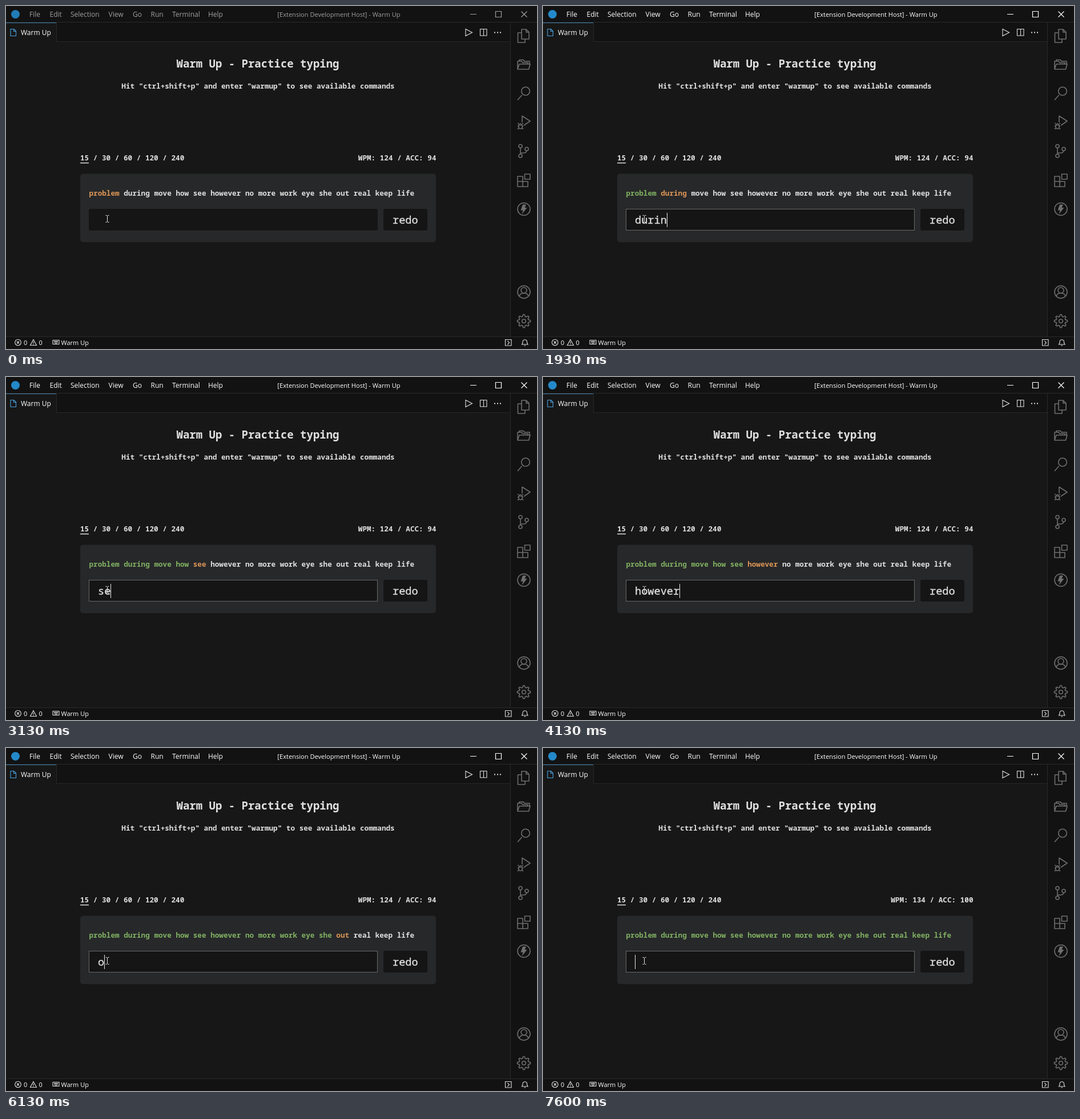
Write an HTML page that moves like this. It is 930 by 602 pixels and loops after 8 s.

```html
<!DOCTYPE html>
<html lang="en">
<head>
<meta charset="utf-8">
<title>Typing practice</title>
<style>
  html, body { margin: 0; width: 100%; height: 100%; overflow: hidden; background: #171717; }
  svg { display: block; width: 930px; height: 602px; }
  text { white-space: pre; fill: #e0e0e0; }
  .ui { font-family: "Open Sans", "Noto Sans", sans-serif; font-size: 12px; }
  .ui text { fill: #fff; }
  .mono { font-family: "Noto Sans Mono", "DejaVu Sans Mono", monospace; font-size: 12.67px; font-weight: 600; }
  .mono .big { font-size: 18.6px; font-weight: 500; stroke: #e0e0e0; stroke-width: .35; }
  .mono .heading { font-size: 19px; font-weight: 700; }
  .bar { fill: #121212; }
  .rule { stroke: #292929; fill: none; }
  .icon { fill: none; stroke: #e0e0e0; stroke-width: 1.1; }
  .side { fill: none; stroke: #6f6f6f; stroke-width: 1.6; stroke-linejoin: round; }
  .small { font-size: 11px; }
  #chrome text { fill: inherit; }
  .done { fill: #80b162; }
  .current { fill: #dc9656; }
</style>
</head>
<body>
<svg viewBox="0 0 930 602">
  <rect class="bar" width="930" height="28"/>
  <rect class="bar" y="29" width="883" height="33"/>
  <rect class="bar" x="884" y="29" width="46" height="551"/>
  <rect class="bar" y="581" width="930" height="21"/>
  <rect y="29" width="88" height="34" fill="#171717"/>
  <path class="rule" d="M0 28.5H930M88.5 29V62.5H883M883.5 29V580M0 580.5H930"/>
  <path d="M0 29.5H88" stroke="#3f7fae"/>

  <!-- title bar -->
  <circle id="logo" cx="16.5" cy="14.5" r="7.5" fill="#2489ca"/>
  <g id="chrome" class="ui">
    <g id="menu"></g>
    <text x="583" y="19" text-anchor="middle" style="font-size:11.1px">[Extension Development Host] - Warm Up</text>
    <path id="buttons" fill="none" stroke-width="1.2" d="M813 14.5H824M857.5 9.5H867.5V19.5H857.5ZM902.5 9.5L912.5 19.5M912.5 9.5L902.5 19.5"/>
  </g>

  <!-- tab strip -->
  <path class="icon" style="stroke:#4aa3e0" d="M8 40.5H14L17.5 44V52.5H8ZM13.5 40.5V44.5H17.5"/>
  <g class="ui"><text x="26" y="51">Warm Up</text></g>
  <path class="icon" d="M805 40.5V52.5L816.5 46.5ZM830.5 40.5H842V52H830.5ZM836.5 40.5V52"/>
  <path stroke="#e0e0e0" stroke-width="2" d="M855 46.5h2m3 0h2m3 0h2"/>

  <!-- activity bar -->
  <g class="side">
    <path d="M903 41H911L916 46V58H903ZM911 41V46H916M903 47H896.5V64H909V58"/>
    <path d="M896 111V97H903L905 99.5H914V102M896 111L899 102H918L915.5 111ZM899 97V94.5H906L908 97H917V102"/>
    <path d="M903.5 156.5L896 165"/><circle cx="910" cy="149.5" r="7.3"/>
    <path d="M904 204V193L918 202L907 209.5M896 206H898M896 211H898M896 216L898 214.5M904 206H906M904 211H906M904 214.5L906 216M898 209H904"/>
    <ellipse cx="901" cy="211" rx="3.3" ry="4.5"/>
    <circle cx="901" cy="246" r="3"/><circle cx="901" cy="263" r="3"/><circle cx="912" cy="251" r="3"/>
    <path d="M901 249V260M912 254Q911 258 906 258H901"/>
    <path d="M896 299H905V308H914V317H896ZM896 308H905V317M908.5 295H918V304H908.5Z"/>
    <circle cx="907" cy="356.5" r="11"/>
    <path fill="#6f6f6f" stroke="none" d="M905 348.5H911L908.5 354H912.5L903.5 365.5L905.5 358.5H901.5Z"/>
    <circle cx="907" cy="502" r="11"/><circle cx="907" cy="499" r="5"/>
    <path d="M899 509.5Q900 504 907 504T915 509.5"/>
    <path id="gear"/><circle cx="907" cy="553" r="3.3"/>
  </g>

  <!-- status bar -->
  <g class="icon">
    <circle cx="21" cy="590.5" r="5.3"/>
    <path d="M19 588.5l4 4m0-4l-4 4M48 585.5L53.5 595.5H42.5ZM48 589v3.5m0 1v1"/>
    <path d="M82 586.5H93V593.5H82ZM84 588.5H91M84 590H91M85 592H90"/>
    <path d="M874.5 585.5H885V596H874.5ZM878.5 588l3 3-3 3"/>
    <path d="M903.5 594H914L912.5 591V589A3.8 3.8 0 0 0 905 589V591ZM907.5 596H910"/>
  </g>
  <g class="ui">
    <text class="small" x="31" y="595">0</text>
    <text class="small" x="57.5" y="595">0</text>
    <text class="small" x="96.5" y="595">Warm Up</text>
  </g>

  <!-- typing test -->
  <g class="mono">
    <text class="heading" x="441" y="108" text-anchor="middle">Warm Up - Practice typing</text>
    <text x="441.5" y="145" text-anchor="middle">Hit "ctrl+shift+p" and enter "warmup" to see available commands</text>
    <text x="130" y="271">15 / 30 / 60 / 120 / 240</text>
    <path d="M130 275.5H145" stroke="#e0e0e0" stroke-width="1.5"/>
    <text id="score" x="753.5" y="271" text-anchor="end"></text>
    <rect x="130" y="294.5" width="623" height="120" rx="5" fill="#27282a"/>
    <text id="words" x="145.5" y="333"></text>
    <rect x="145" y="356" width="506" height="38" rx="3" fill="#151515"/>
    <rect id="focus" x="145.5" y="356.5" width="505" height="37" fill="#151515" stroke="#686868"/>
    <rect x="661" y="356" width="77" height="38" rx="3" fill="#151515"/>
    <text class="big" x="677" y="382">redo</text>
    <text id="typed" class="big" x="161" y="382"></text>
    <path id="caret" d="M.5 363V388" stroke="#e8e8e8"/>
  </g>
  <path fill="none" stroke="#e4e4e4" d="M174.5 367.5H176.5L177.5 368.5L178.5 367.5H180.5M177.5 368V379M174.5 379.5H176.5L177.5 378.5L178.5 379.5H180.5"/>
</svg>
<script>
const $ = id => document.getElementById(id);
const LOOP = 8000, TICKS_PER_MS = 0.015, CHAR = 11.17;
const WINDOW_FOCUS = 1, INPUT_FOCUS = 2, CARET_OFF = 10;

const words = 'problem during move how see however no more work eye she out real keep life'.split(' ');
const text = words.join(' ') + ' ';

// Tick of each keystroke, closing spaces included.
const keys = [
  13, 14, 16, 16, 17, 18, 21, 22,  24, 25, 27, 28, 29, 30, 31,
  33, 33, 34, 34, 35,  38, 40, 40, 42,  44, 47, 49, 50,
  52, 52, 53, 56, 59, 60, 62, 63,  63, 66, 67,
  68, 68, 70, 71, 72,  74, 75, 76, 77, 79,
  80, 82, 83, 85,  87, 87, 89, 90,  92, 93, 94, 95,
  97, 98, 99, 101, 102,  103, 104, 106, 107, 109,
  110, 110, 112, 113, 114
];

const menu = { File: 41, Edit: 76.5, Selection: 113, View: 179.5, Go: 222, Run: 253.5, Terminal: 291, Help: 354 };
$('menu').innerHTML = Object.entries(menu)
  .map(([label, x]) => `<text x="${x}" y="19">${label}</text>`).join('');

$('words').innerHTML = words.map(word => `<tspan>${word}</tspan>`).join(' ');
const spans = [...$('words').children];

const gearPoints = Array.from({ length: 32 }, (_, i) => {
  const angle = (i - 0.5) * Math.PI / 16, radius = i % 4 < 2 ? 11.5 : 8.3;
  return `${907 + radius * Math.cos(angle)} ${553 + radius * Math.sin(angle)}`;
});
$('gear').setAttribute('d', `M${gearPoints.join('L')}Z`);

function draw(ms) {
  const tick = Math.floor((ms + 4) * TICKS_PER_MS);
  const count = keys.filter(key => key <= tick).length;
  const entered = text.slice(0, count).split(' ');
  const current = entered.length - 1;
  const typed = entered[current];

  const active = tick >= WINDOW_FOCUS;
  $('chrome').style.fill = active ? '#fff' : '#a0a0a0';
  $('buttons').style.stroke = active ? '#fff' : '#a0a0a0';
  $('logo').style.opacity = active ? 1 : 0.9;

  const focused = tick >= INPUT_FOCUS;
  const caretOn = focused && (count > 0 || tick < CARET_OFF);
  $('focus').style.display = focused ? '' : 'none';
  $('caret').style.display = caretOn ? '' : 'none';
  $('caret').setAttribute('transform', `translate(${Math.floor(161.4 + CHAR * typed.length)})`);

  $('typed').textContent = typed;
  spans.forEach((span, i) => {
    span.setAttribute('class', i < current ? 'done' : i === current ? 'current' : '');
  });
  $('score').textContent = count === text.length ? 'WPM: 134 / ACC: 100' : 'WPM: 124 / ACC: 94';
}

const start = performance.now();
function frame() {
  draw((performance.now() - start) % LOOP);
  requestAnimationFrame(frame);
}
frame();
</script>
</body>
</html>
```
